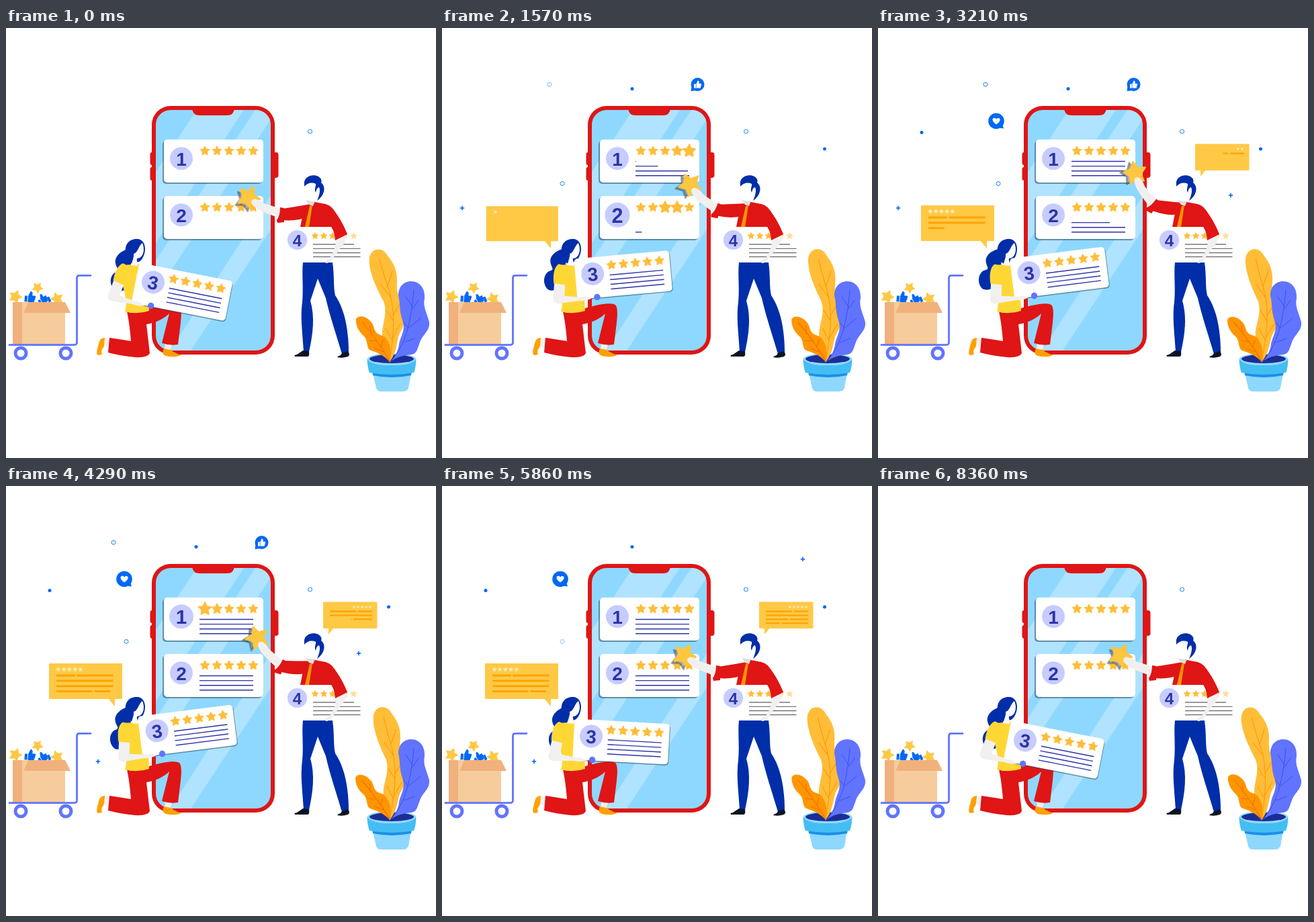
An HTML page for the animation above (8430 ms loop, 640x640 px).

```html
<!DOCTYPE html>
<html lang="en">
<head>
<meta charset="utf-8">
<title>Customer reviews</title>
<style>
html, body { margin: 0; width: 100%; height: 100%; overflow: hidden; background: #fff; }
svg { display: block; width: 100%; height: 100%; }
text { font: bold 28px "Liberation Sans", Arial, sans-serif; text-anchor: middle; fill: #2d33a6; }
</style>
</head>
<body>
<svg id="stage" viewBox="0 0 640 640"></svg>
<script>
const LOOP = 8430;
const RED = '#e01515', NAVY = '#002ea9', BLUE = '#0068f5', VIOLET = '#6174ff', SKY = '#8ed8ff',
  GOLD = '#ffbd38', ORANGE = '#ffa000', SKIN = '#f2f0ef', SHADE = 'rgba(40,75,100,.55)';

// ---- markup helpers ----
const path = (d, fill, extra = '') => `<path d="${d}" fill="${fill}" ${extra}/>`;
const stroke = (d, color, w) => path(d, 'none', `stroke="${color}" stroke-width="${w}" stroke-linecap="round" stroke-linejoin="round"`);
const rect = (x, y, w, h, fill, r = 0) => `<rect x="${x}" y="${y}" width="${w}" height="${h}" rx="${r}" fill="${fill}"/>`;
const dot = (x, y, r, fill, extra = '') => `<circle cx="${x}" cy="${y}" r="${r}" fill="${fill}" ${extra}/>`;
const line = (x1, x2, y, color, w, id = '') => `<line id="${id}" x1="${x1}" x2="${x2}" y1="${y}" y2="${y}" stroke="${color}" stroke-width="${w}"/>`;
const group = (id, body) => `<g id="${id}">${body}</g>`;
const at = (x, y, body, turn = 0, size = 1) => `<g transform="translate(${x} ${y}) rotate(${turn}) scale(${size})">${body}</g>`;
const range = n => [...Array(n).keys()];

function star(r, fill = GOLD) {
  const pts = range(10).map(i => {
    const a = i * Math.PI / 5 - Math.PI / 2, q = i % 2 ? r * .5 : r;
    return `${(q * Math.cos(a)).toFixed(2)} ${(q * Math.sin(a)).toFixed(2)}`;
  });
  return path('M' + pts.join('L') + 'Z', fill, `stroke="${fill}" stroke-width="${r * .16}" stroke-linejoin="round"`);
}

const thumb = fill => path('M-8-1h4v9h-4zM-3-1L0-8Q4-9 3-2H8V1L6 8H-3Z', fill);
const badge = n => dot(0, 0, 17, '#c6ccff') + `<text y="10.5">${n}</text>`;

// ---- phone ----
function phone() {
  return rect(214.5, 185, 8, 19, RED, 3) + rect(214.5, 207, 8, 20, RED, 3) + rect(396, 185, 9.5, 38, RED, 4) +
    rect(217, 116, 183, 370, RED, 28) + rect(223, 122, 171, 358, SKY, 22) +
    `<clipPath id="screen"><rect x="223" y="122" width="171" height="358" rx="22"/></clipPath><g clip-path="url(#screen)">` +
    path('M284 122H354L223 320V214ZM371 122H394V136L223 395V346ZM394 250V300L275 480H244Z', '#afe3ff') + '</g>' +
    path('M277 120H340Q339 130 329 130H288Q278 130 277 120Z', RED);
}

function screenCard(n, y) {
  return rect(233, y + 2, 148, 64, SHADE, 5) + rect(235, y, 148, 64, '#fff', 5) +
    group('num' + n, badge(n)) +
    range(5).map(i => group(`star${n}${i}`, star(7))).join('') +
    range(4).map(i => line(288, 368, y + 32.5 + 7.1 * i, '#2d33a6', 1.4, `row${n}${i}`)).join('');
}

// ---- cart with box ----
function cart() {
  return at(14, 400, star(9.5, '#ffc845'), 22) + at(47, 386.5, star(8, '#ffc845'), -40) + at(76, 403, star(9, '#ffc845'), -20) +
    at(36, 400, thumb(BLUE), 5) + at(54, 403, thumb(BLUE), -30, .9) + at(64, 404, rect(-2, -4, 4, 8, BLUE), -25) +
    rect(10, 408, 78, 63, '#f6cc9c') + rect(10, 408, 14, 63, '#f0b17d') +
    path('M33 408H88L96 424H26Z', '#f0b17d') + path('M24 408H33L26 424H24Z', '#f6cc9c') +
    stroke('M126 368.300H109Q105.500 368.300 105.500 372V468Q105.500 471.700 101 471.700H5', VIOLET, 2.8) +
    [22, 89].map(x => dot(x, 484, 8, '#fff', `stroke="${VIOLET}" stroke-width="5"`)).join('');
}

// ---- plant ----
function plant() {
  const yellow = path('M571 497C574 484 559 472 560 454C561 437 568 424 562 407C553 390 541 366 540.500 346C541 327 560 324 568 339C577 350 582 360 582 375C581 391 583 398 589 410C596 425 594 441 587 452C580 465 584 480 571 497Z', GOLD) +
    stroke('M571 497C578 450 579 420 570 390C563 370 560 358 556 345M572 400L558 382M568 385L575 362M576 435L566 420M576 428L585 412M575 465L565 447M575 462L587 440', '#ff9500', 1);
  const violet = path('M572 497C580 488 584 480 585 470C588 457 595 450 590 435C585 420 587 410 584 398C584 383 594 377 603 377C616 377 624 388 623 402C620 415 627 425 630 438C631 450 622 455 617 465C612 478 612 484 604 486C592 487 580 490 572 497Z', VIOLET) +
    stroke('M572 497C590 477 602 450 607 390M605 415L595 400M605 418L614 405M599 447L592 438M600 446L617 432M592 468L608 462', '#3a50f0', 1);
  const orange = path('M571 497C562 486 549 482 541 479C536 474 539 464 532 458C525 452 520 442 521 433C524 427 535 428 542 436C549 442 546 449 553 455C560 459 564 457 568 466C573 474 574 486 571 497Z', '#ff9500') +
    stroke('M571 497C562 478 545 455 530 437M543 455L542 443M551 466L541 465M558 475L561 464M562 482L549 477', '#f06a00', 1);
  return '<ellipse cx="574" cy="493" rx="36.500" ry="9" fill="#8ed8ff"/><ellipse cx="574" cy="492.500" rx="33" ry="6.500" fill="#1b2e96"/>' +
    path('M546 514L551 536Q552 541 559 541H590Q597 541 599 536L603 514Z', SKY) +
    path('M545 511L546 517Q574 523 603 517L604 511Z', '#1a8fe8') +
    path('M537.500 493Q538 506 541 513Q574 519 607 513Q610 506 610.500 493Q604 502 574 502Q544 502 537.500 493Z', '#44bdf5') +
    group('leaf', yellow) + violet + group('sprout', orange);
}

// ---- man ----
function man() {
  const legs = path('M442 349H486C489 370 487 385 490 398C505 420 510 452 510 482L500 485C491 455 481 425 476 402L464 373L453 406C460 430 457 455 451 482L443 481C441 450 438 430 441 408C443 385 440 365 442 349Z', NAVY);
  const shoes = path('M442 480L451 481Q452 489 449 489H430Q428 487 433 486Z', '#0c1424') +
    path('M500 484L509 481Q513 486 509 489Q500 492 493 490Q494 488 498 487Z', '#0c1424');
  const hair = path('M444 233C442 222 456 216 465 221C470 224 470 228 469 230C477 236 474 250 463 257C467 248 468 241 466 237C462 238 462 242 461 245C458 240 462 235 461 232C455 229 448 231 444 236Z', NAVY);
  const torso = path('M452 262L460 259L470 261Q482 262 488 271Q500 287 508 307L490 316L486 296H438L444 266Z', RED);
  const tie = path('M446 256L455 258L460 257L457 265L451 263Z', '#dedede') + path('M452 265L456 264L451 296H445Z', '#ff9500');
  const sheet = rect(418, 296, 72, 53, '#fff') + at(433.5, 315.5, `<g transform="scale(.86)">${badge(4)}</g>`) +
    [460, 473, 486, 504, 517.5].map((x, i) => at(x, 309.500, star(5, i < 3 ? GOLD : '#ffdf9d'))).join('') +
    line(457, 518, 322, '#777', 1.3) + [328.3, 334.5, 340.5].map(y => line(457, 527.5, y, '#777', 1.3)).join('');
  const near = path('M491 314L506 309Q506 320 498 327L485 345Q479 352 475 349Q474 345 482 342Q491 330 491 314Z', SKIN) +
    path('M484 272L496 283Q503 295 508 307L490 316Q489 300 480 290Z', RED);
  const forearm = at(357, 256, star(17, 'rgba(70,80,85,.45)'), 27) + at(361, 252, star(17, '#ffc63f'), 27) +
    path('M409 269L384 261Q375 254 369 254.500Q363 257 366 262Q372 270 386 275L407 283Z', SKIN) +
    path('M408 267L414 268V289L404 290L403 286Q408 279 408 267Z', RED);
  const arm = path('M458 261Q438 265 411 269Q407 278 411 286Q434 288 449 281Z', RED);
  return legs + shoes + torso + group('arm', arm + group('forearm', forearm)) + tie + hair + sheet + near;
}

// ---- woman ----
function woman() {
  const tail = path('M186 328C172 330 161 340 163 350C164 358 172 361 162 364C153 370 154 386 164 392C176 394 186 384 186 372Z', NAVY);
  const back = path('M155 464L146 461V473L153 477Z', SKIN) +
    path('M147 461C137 462 139 470 136 477Q134 486 137 487L143 486C140 478 146 477 146 472Z', ORANGE);
  const legs = path('M237 469L248 470L244 481L236 480Z', SKIN) +
    path('M235 477Q231 486 238 488Q250 491 261 487Q251 484 245 479Z', ORANGE) +
    path('M180 422C192 427 205 421 213 417C235 411 250 408 258 412C263 418 261 432 256 471Q244 473 232 469L243 425C235 433 222 439 209 441L214 484Q211 491 192 490Q170 488 152 483L154 461L186 466Q184 440 180 422Z', RED);
  const torso = path('M174 353L199 351Q212 380 213 421Q195 427 177 422C183 405 172 380 168 364Q169 356 174 353Z', '#ffd735');
  const head = path('M179 340C174 322 184 313 196 314C207 315 210 330 204 341Q201 348 194 349L190 352Q180 348 179 340Z', NAVY) +
    path('M203 320C208 332 203 343 195 343C194 348 198 350 196 354L186 353Q191 340 190 336C197 334 197 324 203 320Z', '#fbfaf9');
  const card = rect(198.500, 347, 141.500, 60.500, SHADE, 5) + rect(197, 345.500, 142, 60.500, '#fff', 5) +
    at(223, 370, badge(3)) + range(5).map(i => at(252 + 17.9 * i, 359.500, star(7))).join('') +
    range(4).map(i => line(248, 328, 374 + 7 * i, '#2d33a6', 1.4)).join('');
  const hand = dot(226.500, 405, 4.7, VIOLET);
  const arm = path('M165 378L181 381L178 399L201 403Q211 402 218 406.500Q208 410 199 408L168 409.500Q160 409 161 401Z', SKIN) +
    path('M174 351L185 355L183 383L164 379Q164 356 174 351Z', '#ffd735');
  return group('tail', tail) + back + legs + torso + head + group('carry', card + hand + arm);
}

// ---- speech bubbles ----
const bubbles = [
  { id: 'left', tip: [162, 328], x: 64, y: 264, w: 109, h: 53, tail: 'M152 316L162 328V316Z',
    from: 75, to: 159.5, ends: [159.5, 159.5, 159.5, 155], top: 282, step: 7.9, thick: 2.8, gaps: [[0, 104], [3, 130]],
    stars: [78, 86.2, 94.4, 102.6, 110.8], starY: 273, starR: 3.2, pop: 1000, type: 1980, twinkle: 1450, each: 160 },
  { id: 'right', tip: [480, 221], x: 472, y: 172.5, w: 80.5, h: 39.5, tail: 'M480 211V221L488 211Z',
    from: 545, to: 482, ends: [482, 482, 482, 482], top: 186.7, step: 5.8, thick: 2.2, gaps: [[0, 522.5], [2, 516], [3, 504]],
    stars: [542, 536, 530, 524, 518], starY: 180, starR: 2.1, pop: 2250, type: 2940, twinkle: 2900, each: 150 }
];
const bubble = b => group(b.id, rect(b.x, b.y, b.w, b.h, '#ffc946', 1) + path(b.tail, '#ffc946') +
  b.ends.map((e, i) => line(b.from, e, b.top + b.step * i, '#ffa200', b.thick, b.id + 'Row' + i)).join('') +
  b.gaps.map(([i, x]) => rect(x - 1.5, b.top + b.step * i - 2, 3, 4, '#ffc946')).join('') +
  b.stars.map((x, i) => group(b.id + 'Star' + i, star(b.starR, '#ffeebb'))).join(''));

// ---- floating marks: [art, x, y, appears, leaves] ----
const plus = stroke('M-3.2 0H3.2M0-3.2V3.2', BLUE, 1.6).replace(/round/g, 'butt');
const bead = dot(0, 0, 2.5, BLUE);
const ring = dot(0, 0, 3, 'none', 'stroke="#1f82e8" stroke-width="1"');
const like = path('M-9 3L-10 10L-2 9Z', BLUE) + dot(0, 0, 10, BLUE) + `<g transform="scale(.68)">${thumb('#fff')}</g>`;
const love = path('M9 4L11 11L2 10Z', BLUE) + dot(0, 0, 11.8, BLUE) +
  path('M0 5C-9-1-5-6-1.500-4.500Q0-4 0-2.500Q1-5 3.500-4.500C8-3 5 2 0 5Z', '#fff');
const marks = [
  [plus, 30, 268, 350, 3700], [plus, 525, 249, 2600, 5100], [plus, 537, 109, 4700, 7150], [plus, 137, 410, 3700, 7850],
  [bead, 283, 90.5, 900, 6200], [bead, 65, 155.5, 2300, 6200], [bead, 569.5, 180, 1100, 6250],
  [ring, 160, 84, 1300, 4500], [ring, 179, 231.5, 700, 5600],
  [like, 380.5, 84, 400, 5250], [love, 176, 138.5, 2150, 7400]
];

const stage = document.getElementById('stage');
stage.innerHTML = phone() + screenCard(1, 166) + screenCard(2, 250) + cart() + plant() + man() + woman() +
  bubbles.map(bubble).join('') + at(452.5, 154, ring) + marks.map((m, i) => group('mark' + i, m[0])).join('');
const el = {};
stage.querySelectorAll('[id]').forEach(e => { if (e.id) el[e.id] = e; });

// ---- motion ----
const clamp = p => Math.max(0, Math.min(1, p));
const ramp = (t, a, b) => clamp((t - a) / (b - a));
const smooth = (t, a, b) => { const p = ramp(t, a, b); return p * p * (3 - 2 * p); };
const cubic = (t, a, b) => { const p = ramp(t, a, b); return p < .5 ? 4 * p ** 3 : 1 - 4 * (1 - p) ** 3; };
const swell = (t, peak, half) => Math.abs(t - peak) < half ? Math.cos((t - peak) / half * Math.PI / 2) ** 2 : 0;
const turn = (id, a, x, y) => el[id].setAttribute('transform', `rotate(${a} ${x} ${y})`);
const place = (id, x, y, s) => el[id].setAttribute('transform', `translate(${x} ${y}) scale(${s})`);
const upDown = (t, a, b, c, d) => smooth(t, a, b) - smooth(t, c, d);

function track(t, keys) {
  let v = keys[0][1];
  for (let i = 1; i < keys.length; i++) v += (keys[i][1] - keys[i - 1][1]) * smooth(t, keys[i - 1][0], keys[i][0]);
  return v;
}

function drawCard(t, n, y, typeStart, lineTime, gap, waves) {
  const beat = 190;
  for (let i = 0; i < 5; i++) {
    const s = waves.reduce((sum, w) => sum + swell(t, w + i * beat, 300), 0);
    place(`star${n}${i}`, 296 + 18 * i, y + 17, 1 + .42 * s);
  }
  const s = waves.reduce((sum, w) => sum + swell(t, w + 1.4 * beat, 430), 0);
  place('num' + n, 261, y + 28.3, 1 + .18 * s);
  for (let i = 0; i < 4; i++) {
    const k = 3 - i, start = typeStart + k * gap, out = 6300 + k * 370;
    const row = el[`row${n}${i}`];
    row.setAttribute('x2', 288 + 80 * cubic(t, start, start + lineTime));
    row.setAttribute('opacity', 1 - smooth(t, out, out + 550));
  }
}

function drawBubble(t, b) {
  const s = upDown(t, b.pop, b.pop + 620, 7080, 7680), [x, y] = b.tip;
  el[b.id].setAttribute('transform', `translate(${x} ${y}) scale(${s}) translate(${-x} ${-y})`);
  b.ends.forEach((e, i) => {
    const p = ramp(t, b.type + 540 * i, b.type + 540 * (i + 1));
    el[b.id + 'Row' + i].setAttribute('x2', b.from + (b.to - b.from) * Math.min(p, (e - b.from) / (b.to - b.from)));
  });
  b.stars.forEach((sx, i) => place(b.id + 'Star' + i, sx, b.starY, smooth(t, b.twinkle + b.each * i, b.twinkle + b.each * (i + 1))));
}

function draw(t) {
  drawCard(t, 1, 166, 410, 1000, 345, [840, 4290]);
  drawCard(t, 2, 250, 1170, 1300, 640, [1090, 4680]);

  turn('carry', 11.2 - 18.4 * upDown(t, 300, 1900, 4700, 6850), 178, 354);
  turn('tail', track(t, [[0, 0], [2800, 8], [5500, -4], [8200, 0]]), 185, 330);

  const lift = upDown(t, 500, 2700, 3500, 5600);
  turn('arm', 15 * lift, 462, 272);
  turn('forearm', 18 * lift, 409, 277);

  const sway = upDown(t, 0, 2500, 3800, 7800);
  turn('leaf', 2.4 * sway, 571, 497);
  turn('sprout', -.8 * sway, 571, 497);

  bubbles.forEach(b => drawBubble(t, b));
  marks.forEach(([art, x, y, a, b], i) => {
    const v = upDown(t, a, a + 500, b, b + 500);
    const beat = i ? 0 : swell(t, 2600, 500);
    place('mark' + i, x, y, art === ring ? 1 : v + beat);
    el['mark' + i].setAttribute('opacity', art === ring ? v : 1);
  });
}

const begin = performance.now();
function tick() {
  draw((performance.now() - begin) % LOOP);
  requestAnimationFrame(tick);
}
tick();
</script>
</body>
</html>
```
